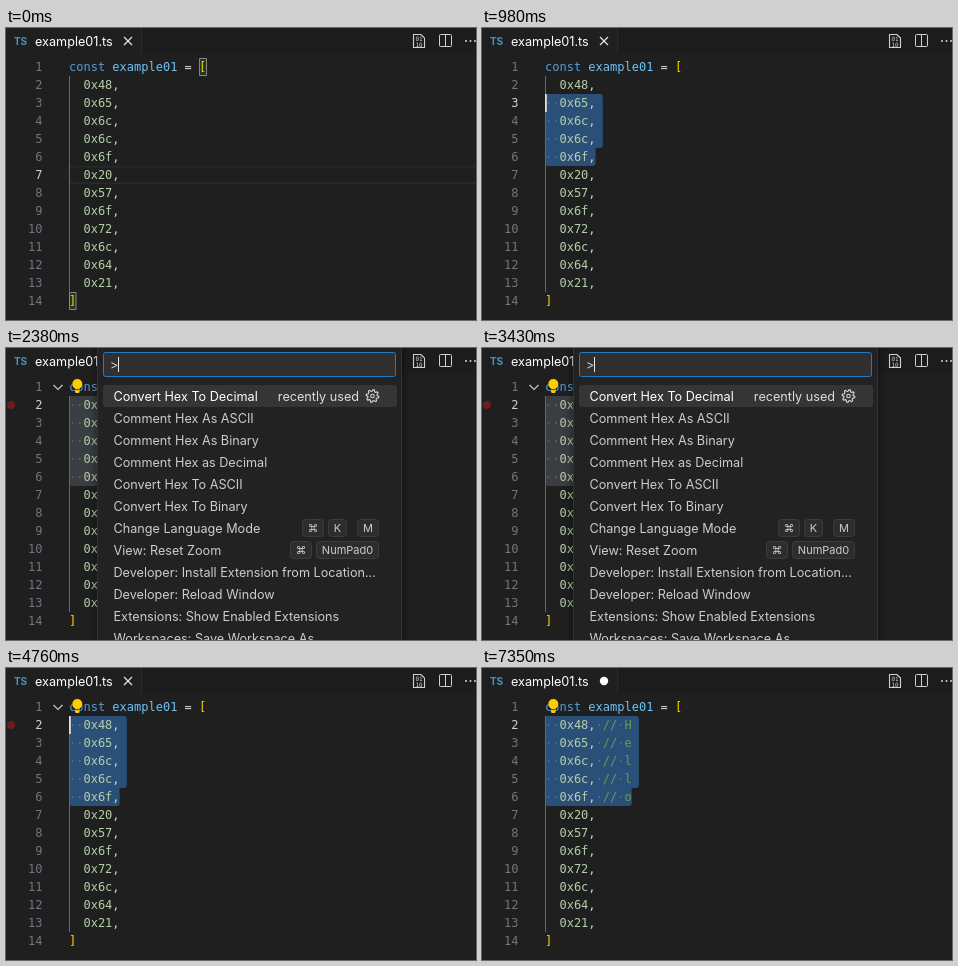
Recreate the animation shown at these times as an HTML page with a canvas. Size 470 px wide and 292 px high, loop 7700 ms.

```html
<!DOCTYPE html>
<html lang="en">
<head>
<meta charset="utf-8">
<style>
html, body { margin: 0; width: 100%; height: 100%; overflow: hidden; background: #1f1f1f; }
canvas { display: block; width: 470px; height: 292px; }
</style>
</head>
<body>
<canvas id="stage"></canvas>
<script>
const W = 470, H = 292, LOOP = 7700;
const LEFT = 63, TOP = 30, ROW = 18, CHAR = 7.224;
const MONO = '12px "DejaVu Sans Mono", monospace';
const UI = '12.65px Inter, sans-serif';
const HEX = ['48', '65', '6c', '6c', '6f', '20', '57', '6f', '72', '6c', '64', '21'];
const COMMANDS = [
  'Convert Hex To Decimal', 'Comment Hex As ASCII', 'Comment Hex As Binary',
  'Comment Hex as Decimal', 'Convert Hex To ASCII', 'Convert Hex To Binary',
  'Change Language Mode', 'View: Reset Zoom',
  'Developer: Install Extension from Location...', 'Developer: Reload Window',
  'Extensions: Show Enabled Extensions', 'Workspaces: Save Workspace As...'
];
// Caret position while dragging upwards: [time, line, column]
const DRAG = [[0, 7, 7], [210, 6, 7], [630, 6, 5], [700, 6, 3], [770, 5, 2],
  [840, 4, 2], [910, 4, 0], [980, 3, 0], [1260, 2, 0]];

const canvas = document.getElementById('stage');
const ratio = window.devicePixelRatio || 1;
canvas.width = W * ratio;
canvas.height = H * ratio;
const ctx = canvas.getContext('2d');
ctx.scale(ratio, ratio);

const within = (t, from, to) => t >= from && t < to;
const ramp = (t, from, to) => Math.min(1, Math.max(0, (t - from) / (to - from)));
const lineTop = line => TOP + ROW * (line - 1);
const colX = col => LEFT + CHAR * col;

function rect(x, y, w, h, color) {
  ctx.fillStyle = color;
  ctx.fillRect(x, y, w, h);
}

function box(x, y, w, h, radius, fill, stroke) {
  ctx.beginPath();
  ctx.roundRect(x, y, w, h, radius);
  if (fill) { ctx.fillStyle = fill; ctx.fill(); }
  if (stroke) { ctx.strokeStyle = stroke; ctx.lineWidth = 1; ctx.stroke(); }
}

function dot(x, y, r, color) {
  ctx.beginPath();
  ctx.arc(x, y, r, 0, 7);
  ctx.fillStyle = color;
  ctx.fill();
}

function path(points, color, width) {
  ctx.beginPath();
  points.forEach(([x, y]) => ctx.lineTo(x, y));
  ctx.strokeStyle = color;
  ctx.lineWidth = width;
  ctx.stroke();
}

function text(str, x, y, color, font = UI, align = 'left') {
  ctx.font = font;
  ctx.textAlign = align;
  ctx.fillStyle = color;
  ctx.fillText(str, x, y);
}

const code = (str, line, col, color) => text(str, colX(col), lineTop(line) + 13, color, MONO);

function drawHeader(dirty) {
  rect(136, 0, W - 136, 26, '#1c1c1c');
  rect(135, 0, 1, 26, '#2b2b2b');
  text('TS', 8, 16.5, '#4b93bd', 'bold 10px Inter, sans-serif');
  text('example01.ts', 29, 17.5, '#ffffff');
  if (dirty) dot(122, 13, 4.2, '#ffffff');
  else {
    path([[118, 9], [126, 17]], '#e0e0e0', 1.2);
    path([[126, 9], [118, 17]], '#e0e0e0', 1.2);
  }
  const icon = '#d0d0d0';
  path([[407.5, 6.5], [415, 6.5], [418.5, 10], [418.5, 19.5], [407.5, 19.5], [407.5, 6]], icon, 1.1);
  const tiny = '6px "DejaVu Sans Mono", monospace';
  text('01', 413, 13.2, icon, tiny, 'center');
  text('10', 413, 18.5, icon, tiny, 'center');
  box(433.5, 6.5, 12, 12, 1, null, icon);
  path([[439.5, 6.5], [439.5, 18.5]], icon, 1);
  for (const x of [460, 464.5, 469]) dot(x, 13, 1, icon);
}

// Columns at the end of a hex row
const rowEnd = (line, commented) => commented && line <= 6 ? 12 : 7;

function drawSelection(line, col, commented, color) {
  for (let n = line; n <= 6; n++) {
    const from = colX(n === line ? col : 0);
    const to = colX(rowEnd(n, commented) + (n < 6 ? 1 : 0));
    const top = n === line ? 3 : 0;
    const bottom = n === 6 ? 3 : 0;
    box(from, lineTop(n), to - from, ROW, [top, top, n >= 5 ? 3 : 0, bottom], color);
  }
}

function drawWhitespace(line, col, commented) {
  for (let n = line; n <= 6; n++) {
    for (const c of commented ? [0, 1, 7, 10] : [0, 1]) {
      if (n > line || c >= col) dot(colX(c + 0.5), lineTop(n) + 9, 0.8, 'rgba(255,255,255,.3)');
    }
  }
}

function drawEditor(t) {
  const [, line, col] = DRAG.findLast(step => t >= step[0]);
  const selecting = t >= 630;
  const commented = t >= 4830;
  const blurred = within(t, 2380, 4760);

  if (selecting) drawSelection(line, col, commented, blurred ? '#3a3d41' : '#2a5079');
  else {
    ctx.strokeStyle = '#292929';
    ctx.lineWidth = 1.5;
    ctx.strokeRect(LEFT, lineTop(line) + 0.75, W, ROW - 1.5);
    box(colX(18) + 0.5, 30.5, 7, 17, 0, '#27321f', '#888888');
    box(LEFT + 0.5, lineTop(14) + 0.5, 6.5, 17, 0, '#27321f', '#888888');
  }
  rect(LEFT, lineTop(2), 1, ROW * 12, '#686868');
  if (selecting) drawWhitespace(line, col, commented);

  for (let n = 1; n <= 14; n++) {
    text(n, 36.5, lineTop(n) + 13, n === line ? '#d0d0d0' : '#6e7681', MONO, 'right');
  }
  code('const', 1, 0, '#569cd6');
  code('example01', 1, 6, '#6fc3f5');
  code('=', 1, 16, '#d4d4d4');
  code('[', 1, 18, '#ffd700');
  HEX.forEach((hex, i) => {
    code('0x' + hex, i + 2, 2, '#b5cea8');
    code(',', i + 2, 6, '#cccccc');
    if (commented && i < 5) code('// ' + 'Hello'[i], i + 2, 8, '#6a9955');
  });
  code(']', 14, 0, '#ffd700');

  const caretOn = within(t, 210, 1750) || within(t, 2240, 2380) || within(t, 4760, 5250) ||
    within(t, 5810, 6300) || within(t, 6790, 7350);
  if (caretOn) rect(colX(col), lineTop(line), 1.8, ROW, '#e0e0e0');

  ctx.globalAlpha = ramp(t, 1470, 1960) * (1 - ramp(t, 6720, 7140));
  path([[47.5, 37], [52, 41.5], [56.5, 37]], '#c5c5c5', 1.2);
  ctx.globalAlpha = 1;
  if (within(t, 1540, 6790)) dot(5, 57, 4, '#6b1e1e');
  if (t >= 1470) {
    dot(71.3, 36, 5, '#ffcc00');
    box(69, 39, 4.6, 6, 1.5, '#ffcc00');
    rect(69, 41.3, 4.6, 0.8, '#1f1f1f');
  }
}

function drawGear(x, y) {
  const color = '#d8d8d8';
  ctx.strokeStyle = color;
  ctx.lineWidth = 1.1;
  ctx.beginPath();
  for (let i = 0; i < 32; i++) {
    const a = (i + 0.5) * Math.PI / 16;
    const r = i % 4 < 2 ? 6.4 : 4.7;
    ctx.lineTo(x + r * Math.cos(a), y + r * Math.sin(a));
  }
  ctx.closePath();
  ctx.stroke();
  ctx.beginPath();
  ctx.arc(x, y, 1.8, 0, 7);
  ctx.stroke();
}

function drawKey(label, x, y, w) {
  box(x + 0.5, y - 8.5, w - 1, 17, 3, '#2d2d2d', '#3c3c3c');
  text(label, x + w / 2, y + 4, '#cccccc', '11px Inter, "DejaVu Sans", sans-serif', 'center');
}

function drawPalette(t) {
  const active = t < 3780 ? 0 : 1;
  ctx.save();
  ctx.shadowColor = 'rgba(0,0,0,.5)';
  ctx.shadowBlur = 8 * ratio;
  rect(91, -10, 305, H + 20, '#222222');
  ctx.restore();
  rect(91, 0, 1, H, '#343434');
  rect(395, 0, 1, H, '#343434');

  box(97.5, 4.5, 292, 24, 2, '#303030', '#2479c9');
  text('>', 104, 21, '#cccccc');
  if (!within(t, 2940, 3430) && !within(t, 3990, 4480)) rect(112, 9, 1, 15, '#e8e8e8');

  box(97, 37 + 22 * active, 294, 22, 3, '#353535');
  COMMANDS.forEach((name, i) => {
    text(name, 107.5, 52.5 + 22 * i, i === active ? '#ffffff' : '#cccccc');
  });
  if (active === 0) text('recently used', 353, 52.5, '#dddddd', UI, 'right');
  else text('recently used', 377, 52.5, '#969696', UI, 'right');
  drawGear(366.5, 48 + 22 * active);

  drawKey('⌘', 296, 180, 22);
  drawKey('K', 322, 180, 19);
  drawKey('M', 351, 180, 22);
  drawKey('⌘', 284, 202, 22);
  drawKey('NumPad0', 310, 202, 63);
}

function frame(now) {
  const t = now % LOOP;
  rect(0, 0, W, H, '#1f1f1f');
  drawHeader(t >= 4830);
  drawEditor(t);
  if (within(t, 2380, 4760)) drawPalette(t);
  requestAnimationFrame(frame);
}
requestAnimationFrame(frame);
</script>
</body>
</html>
```
